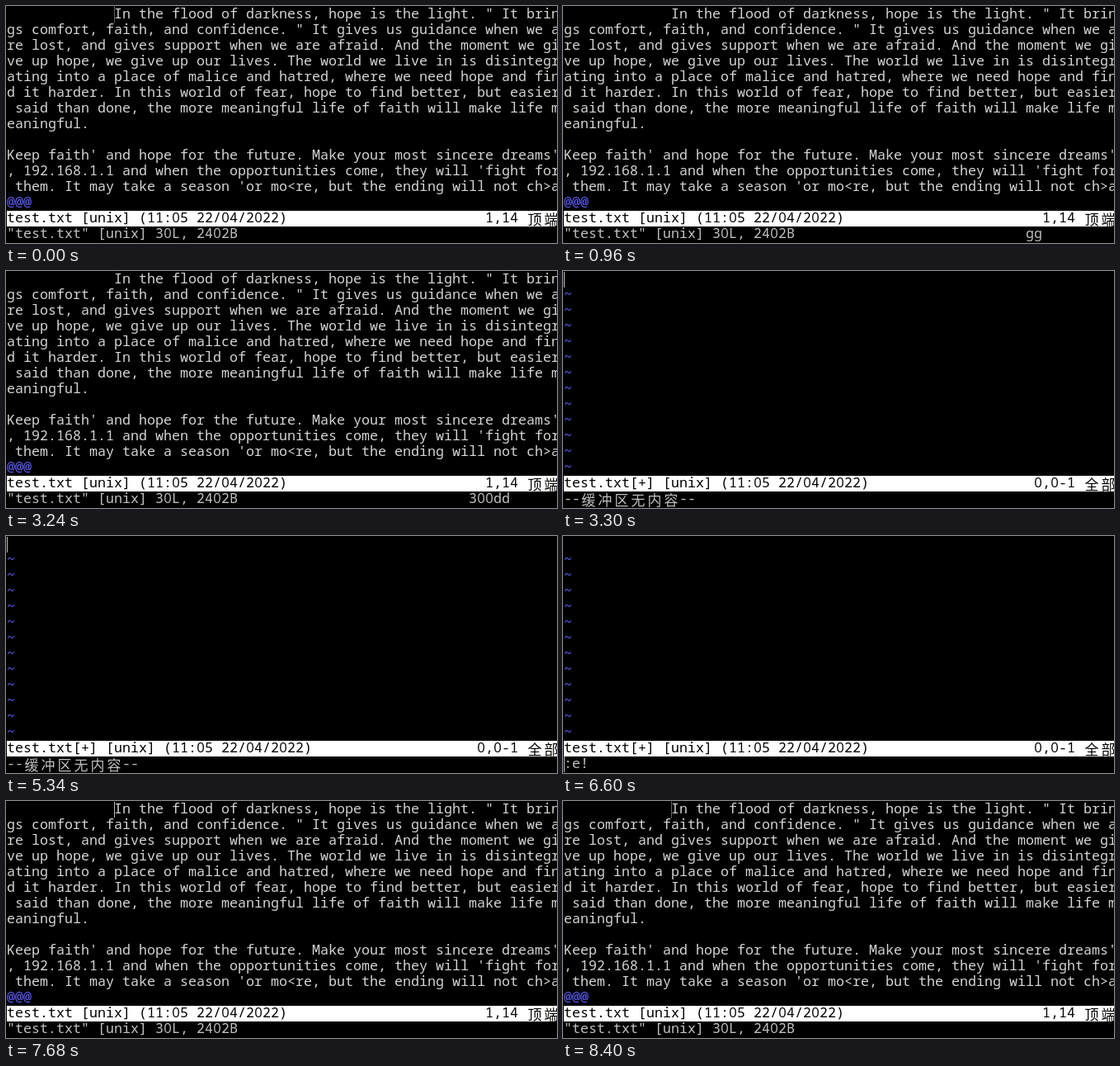
Recreate the animation shown at these times as an HTML page with a canvas. Size 668x287 px, loop 8.46 s.

```html
<!DOCTYPE html>
<html lang="en">
<head>
<meta charset="utf-8">
<title>Terminal editor</title>
<style>
  html, body { margin: 0; width: 100%; height: 100%; overflow: hidden; background: #000; }
  canvas { display: block; }
</style>
</head>
<body>
<canvas id="term" width="668" height="287"></canvas>
<script>
const ctx = document.getElementById('term').getContext('2d');
const LOOP = 8460, CELL_W = 10, CELL_H = 19, STATUS = 13, CMD = 14;
const BODY = '#d4d4d4', GRAY = '#c0c0c0', BLUE = '#6060ff';
const MONO = '16.67px "Noto Sans Mono", "DejaVu Sans Mono", monospace';
const ZERO = '16.67px "Open Sans", "Noto Sans", sans-serif'; // zero without a slash
const HAN = '300 17px "Noto Sans CJK SC", "Noto Sans CJK", sans-serif';

const page = [
  '             In the flood of darkness, hope is the light. " It brin',
  'gs comfort, faith, and confidence. " It gives us guidance when we a',
  're lost, and gives support when we are afraid. And the moment we gi',
  've up hope, we give up our lives. The world we live in is disintegr',
  'ating into a place of malice and hatred, where we need hope and fin',
  'd it harder. In this world of fear, hope to find better, but easier',
  ' said than done, the more meaningful life of faith will make life m',
  'eaningful.',
  '',
  "Keep faith' and hope for the future. Make your most sincere dreams'",
  ", 192.168.1.1 and when the opportunities come, they will 'fight for",
  " them. It may take a season 'or mo<re, but the ending will not ch>a"
];

// [start time, value], the last one already started applies
const keys = [[0, ''], [660, 'g'], [960, 'gg'], [1020, ''], [2520, '3'], [2580, '30'],
  [2700, '300'], [3060, '300d'], [3240, '300dd'], [3300, '']];
const command = [[0, '"test.txt" [unix] 30L, 2402B'], [3300, '--缓冲区无内容--'],
  [5400, ':'], [6000, ':e'], [6300, ':e!'], [6660, '"test.txt" [unix] 30L, 2402B']];

const HOME = [13, 0], TOP = [0, 0];
const cursor = [[0, HOME], [960, null], [1020, HOME], [1500, null], [1980, HOME],
  [3240, null], [3300, TOP], [3780, null], [4320, TOP], [4800, null], [5340, TOP],
  [5400, [1, CMD]], [5940, null], [6060, [2, CMD]], [6300, [3, CMD]], [6600, [0, CMD]],
  [6660, HOME], [7200, null], [7680, HOME], [8220, null], [8400, HOME]];
// the window has no focus around the loop point, so the cursor is dotted
const focused = [[0, false], [240, true], [8400, false]];

function at(track, t) {
  let value;
  for (const [start, v] of track) if (start <= t) value = v;
  return value;
}

function put(text, col, row, color) {
  ctx.fillStyle = color;
  ctx.textAlign = 'center';
  for (const ch of text) {
    const wide = ch > '\u2e80';
    const span = wide ? 2 : 1;
    ctx.font = wide ? HAN : ch === '0' ? ZERO : MONO;
    ctx.fillText(ch, 1 + (col + span / 2) * CELL_W, row * CELL_H + (wide ? 18 : 15));
    col += span;
  }
}

function drawStatus(name, pos, where) {
  ctx.fillStyle = '#fff';
  ctx.fillRect(1, 1 + STATUS * CELL_H, 667, CELL_H);
  put(name + ' [unix] (11:05 22/04/2022)', 0, STATUS, '#000');
  put(pos, 62 - pos.length, STATUS, '#000');
  put(where, 63, STATUS, '#000');
}

function drawCursor([col, row], solid) {
  ctx.fillStyle = GRAY;
  for (let y = 0; y < CELL_H; y += solid ? 1 : 2) {
    ctx.fillRect(1 + col * CELL_W, 1 + row * CELL_H + y, 1, 1);
  }
}

function draw(t) {
  ctx.fillStyle = '#000';
  ctx.fillRect(0, 0, 668, 287);
  if (t >= 3300 && t < 6660) {
    for (let row = 1; row < STATUS; row++) put('~', 0, row, BLUE);
    drawStatus('test.txt[+]', '0,0-1', '全部');
  } else {
    page.forEach((line, row) => put(line, 0, row, BODY));
    put('@@@', 0, 12, BLUE);
    drawStatus('test.txt', '1,14', '顶端');
  }
  put(at(command, t), 0, CMD, GRAY);
  put(at(keys, t), 56, CMD, GRAY);
  const cell = at(cursor, t);
  if (cell) drawCursor(cell, at(focused, t));
}

const begin = performance.now();
function tick() {
  draw((performance.now() - begin) % LOOP);
  requestAnimationFrame(tick);
}
tick();
</script>
</body>
</html>
```
